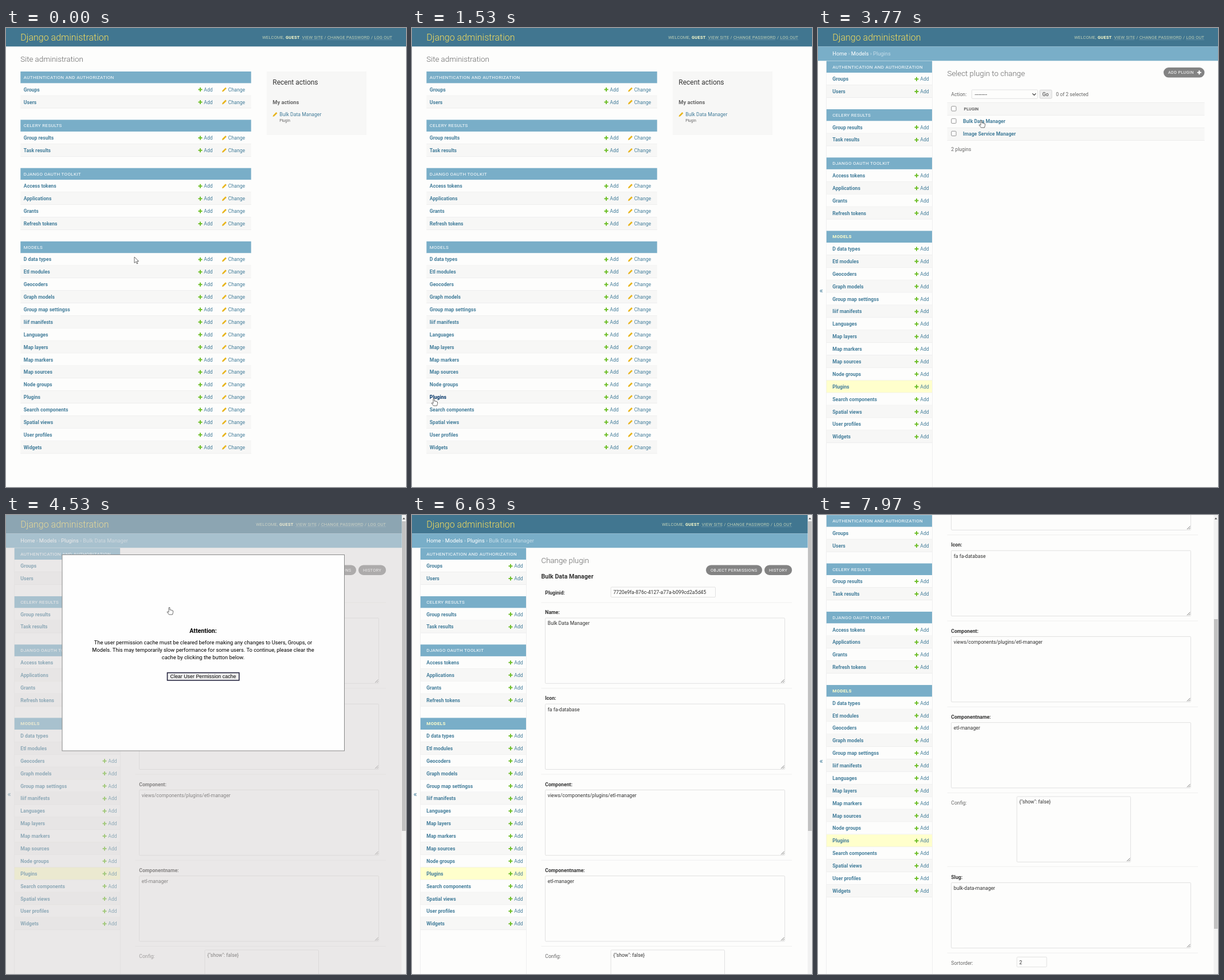
Write an HTML page that moves like this. It is 698 px wide and 802 px high and loops after 8 s.

```html
<!DOCTYPE html>
<html lang="en">
<head>
<meta charset="utf-8">
<title>Site administration</title>
<style>
html, body { margin: 0; width: 100%; height: 100%; overflow: hidden; background: #fdfdfc; }
svg { display: block; width: 100vw; height: 100vh; font-family: Roboto, sans-serif; }
text { white-space: pre; }
#index, #list, #form, #modal, #cursor, #arrow, #hand, .target { animation: 8s step-end infinite; }
#index { animation-name: index; }
#list { animation-name: list; }
#form { animation-name: form; }
#modal { animation-name: modal; }
#arrow { animation-name: arrow; }
#hand { animation-name: hand; }
.target { animation-name: hover; }
#cursor { animation: move 8s ease-in-out infinite; }
#page { animation: scroll 8s linear infinite; }
#sticky { animation: stick 8s linear infinite; }
#thumb { animation: thumb 8s linear infinite; }
@keyframes index { 0% { visibility: visible } 23.4%, 100% { visibility: hidden } }
@keyframes list { 0% { visibility: hidden } 23.4% { visibility: visible } 53.4%, 100% { visibility: hidden } }
@keyframes form { 0% { visibility: hidden } 53.4%, 100% { visibility: visible } }
@keyframes modal { 0% { visibility: hidden } 53.4% { visibility: visible } 78%, 100% { visibility: hidden } }
@keyframes hover { 0% { fill: #447e9b } 15.6%, 100% { fill: #003366 } }
@keyframes arrow {
  0%, 31%, 59.8% { visibility: visible }
  15.6%, 42.2%, 68.5%, 100% { visibility: hidden }
}
@keyframes hand {
  0%, 31%, 59.8%, 78%, 100% { visibility: hidden }
  15.6%, 42.2%, 68.5% { visibility: visible }
}
@keyframes move {
  0%, 4% { transform: translate(224px, 400px) }
  16%, 30.5% { transform: translate(38px, 647px); animation-timing-function: ease-in }
  34.6% { transform: translate(75px, 534px); animation-timing-function: ease-out }
  43%, 59% { transform: translate(285px, 161px) }
  70%, 100% { transform: translate(357px, 281px) }
}
@keyframes scroll {
  0%, 88.1% { transform: translateY(0) }
  91.25% { transform: translateY(-72.5px) }
  99.6%, 100% { transform: translateY(-268px) }
}
@keyframes stick {
  0%, 88.1% { transform: translateY(0) }
  90.6%, 100% { transform: translateY(-57.4px) }
}
@keyframes thumb {
  0%, 88.1% { transform: translateY(0) }
  91.25% { transform: translateY(46px) }
  99.6%, 100% { transform: translateY(170.5px) }
}
</style>
</head>
<body>
<svg id="stage" viewBox="0 0 698 802" preserveAspectRatio="none"></svg>
<script>
const LINK = '#447e9b', GREY = '#666', DARK = '#333', SHADE = '#f7f7f6', RULE = '#ebebeb';
const WIDTH = 698, ROW = 21.88, HEAD = 20.6, GAP = 20;
const modules = [
  ['Authentication and Authorization', 'Groups,Users'],
  ['Celery Results', 'Group results,Task results'],
  ['Django OAuth Toolkit', 'Access tokens,Applications,Grants,Refresh tokens'],
  ['Models', 'D data types,Etl modules,Geocoders,Graph models,Group map settingss,Iiif manifests,' +
    'Languages,Map layers,Map markers,Map sources,Node groups,Plugins,Search components,' +
    'Spatial views,User profiles,Widgets']
];

const rect = (x, y, w, h, fill, extra = '') =>
  `<rect x="${x}" y="${y}" width="${w}" height="${h}" fill="${fill}" ${extra}/>`;
const box = (x, y, w, h, stroke = '#dadada', fill = '#fdfdfc', r = 1.5) =>
  rect(x, y, w, h, fill, `stroke="${stroke}" stroke-width=".8" rx="${r}"`);
const rule = (x1, x2, y) => rect(x1, y - .4, x2 - x1, .8, RULE);
// y is the middle of the capitals
const text = (x, y, str, fill = GREY, size = 8.67, extra = '') =>
  `<text x="${x}" y="${y + size * .356}" fill="${fill}" font-size="${size}" ${extra}>${str}</text>`;
const bold = (x, y, str, fill = LINK, size = 8.67, extra = '') =>
  text(x, y, str, fill, size, 'font-weight="700" ' + extra);
const light = (x, y, str, fill, size) => text(x, y, str, fill, size, 'font-weight="300"');
const plus = (x, y, fill = '#70bf2b') =>
  `<path transform="translate(${x} ${y})" fill="${fill}" d="M-1-3.5h2v2.5h2.5v2h-2.5v2.5h-2v-2.5h-2.5v-2h2.5z"/>`;
const pencil = (x, y) =>
  `<path transform="translate(${x} ${y})" fill="#e8b51c" d="M-4 4l.7-2.6L2-3.9L3.9-2L-1.4 3.3z"/>`;
const pill = (x, y, w, label) =>
  rect(x, y - 8.7, w, 17.4, '#838383', 'rx="8.7"') +
  text(x + 8, y, label, '#fff', 7.33, 'letter-spacing=".33"');

function header(right) {
  const shift = right - 674;
  const underline = (x1, x2) => rect(x1 + shift, 20.3, x2 - x1, .7, '#fff', 'opacity=".25"');
  return rect(0, 0, WIDTH, 32.3, '#417690') +
    light(25.3, 16.4, 'Django administration', '#f5dd5d', 16) +
    text(right + .3, 16.6, 'WELCOME, <tspan font-weight="700">GUEST</tspan>. VIEW SITE / CHANGE PASSWORD / LOG OUT',
      '#ffc', 7.33, 'font-weight="300" letter-spacing=".33" text-anchor="end"') +
    underline(516, 552) + underline(560, 634) + underline(642, 674);
}

function crumbs(parents, last) {
  const sep = '<tspan fill="#c4dce8"> › </tspan>';
  return rect(0, 32.3, WIDTH, 25, '#79aec8') +
    text(25.3, 45, parents.join(sep) + sep + `<tspan fill="#c4dce8">${last}</tspan>`, '#fff', 9.33);
}

function moduleList(x, top, width, sidebar) {
  const pad = sidebar ? 10.5 : 5.5, addX = sidebar ? 172 : 339;
  let y = top, out = '';
  for (const [title, names] of modules) {
    const current = sidebar && title === 'Models';
    out += rect(x, y, width, HEAD, '#79aec8') +
      text(x + pad, y + 10.2, title.toUpperCase(), current ? '#ffc' : '#fff', 8,
        `letter-spacing=".33" font-weight="${current ? 700 : 400}"`);
    y += HEAD;
    names.split(',').forEach((name, i) => {
      const mid = y + ROW / 2, plugin = name === 'Plugins';
      const fill = sidebar && plugin ? '#ffffcc' : i % 2 ? SHADE : '#fdfdfc';
      out += rect(x, y, width, ROW, fill) + rule(x, x + width, y + ROW - .4) +
        bold(x + pad, mid, name, LINK, 8.67, plugin && !sidebar ? 'class="target"' : '') +
        plus(addX, mid) + text(addX + 6.3, mid, 'Add', LINK);
      if (!sidebar) out += pencil(381, mid) + text(387.8, mid, 'Change', LINK);
      y += ROW;
    });
    y += GAP;
  }
  return out;
}

const sidebar = toggleY =>
  rect(14, 57.3, .8, 900, RULE) + rect(199, 57.3, .8, 900, RULE) +
  moduleList(14.8, 57.6, 184.2, true) + text(2.6, toggleY + 1, '«', LINK, 13.33);

function indexPage() {
  return header(674) + light(25.3, 54.5, 'Site administration', GREY, 13.33) +
    moduleList(25.3, 76, 402.4, false) +
    rect(455, 76, 174, 111, SHADE) +
    text(465.3, 94.3, 'Recent actions', DARK, 12) +
    bold(465.3, 129.2, 'My actions', GREY, 9.33) +
    pencil(469.5, 151) + text(477.3, 151.3, 'Bulk Data Manager', LINK) +
    text(477.3, 162, 'Plugin', GREY, 6.67);
}

function listPage() {
  const check = y => box(232.8, y - 4.2, 8.2, 8.2, '#767676', '#fff');
  return header(674) + crumbs(['Home', 'Models'], 'Plugins') + sidebar(457) +
    light(225.5, 79, 'Select plugin to change', GREY, 13.33) +
    pill(603, 77.8, 71.5, 'ADD PLUGIN') + plus(665.3, 77.8, '#fff') +
    text(232.3, 115.6, 'Action:') + box(268.3, 108, 115, 15.3) + text(273.5, 115.6, '---------', DARK) +
    '<path d="M374.2 114.3l3 3l3-3" fill="none" stroke="#333" stroke-width="1.2"/>' +
    box(387, 108.3, 21, 14.8, '#ccc', '#efefef') + text(391.6, 115.8, 'Go', DARK) +
    text(415.2, 115.6, '0 of 2 selected') +
    rect(225.5, 130.3, 449, 22, SHADE) + rule(225.5, 674.5, 130.3) + rule(225.5, 674.5, 152.4) +
    rect(225.5, 174.5, 449, 22, SHADE) + rule(225.5, 674.5, 174.3) + rule(225.5, 674.5, 196.5) +
    check(141) + check(162.6) + check(184.5) +
    bold(254.5, 141.6, 'PLUGIN', GREY, 7.33) +
    bold(253, 163.4, 'Bulk Data Manager') + bold(253, 185.4, 'Image Service Manager') +
    text(232.3, 211.5, '2 plugins');
}

function area(x, y, w, value) {
  const r = x + w - 1, b = y + 114 - 1;
  return box(x, y, w, 114.3) + text(x + 4.3, y + 9.4, value, DARK) +
    `<path d="M${r - 5.5} ${b}L${r} ${b - 5.5}M${r - 2.5} ${b}L${r} ${b - 2.5}" stroke="#555" stroke-width=".8"/>`;
}

function formPage() {
  const field = (y, label, value) =>
    bold(232.3, y, label, DARK) + area(232.5, y + 9.8, 418, value) + rule(225.5, 663, y + 132.6);
  const fields = [['Name:', 'Bulk Data Manager'], ['Icon:', 'fa fa-database'],
    ['Component:', 'views/components/plugins/etl-manager'], ['Componentname:', 'etl-manager']];
  return '<g id="page">' + header(663) +
    crumbs(['Home', 'Models', 'Plugins'], 'Bulk Data Manager') +
    light(225.5, 78.8, 'Change plugin', GREY, 13.33) +
    pill(513, 96.2, 98, 'OBJECT PERMISSIONS') + pill(615, 96.2, 48, 'HISTORY') +
    bold(225.5, 107.3, 'Bulk Data Manager', DARK, 10.67) +
    bold(232.3, 136.4, 'Pluginid:', DARK) + box(347, 126, 182.5, 17.6) +
    text(351.2, 135.2, '7720e9fa-876c-4127-a77a-b099cd2a5d45', DARK) + rule(225.5, 663, 153) +
    fields.map(([label, value], i) => field(170.2 + i * 150.2, label, value)).join('') +
    text(232.3, 770.8, 'Config:') + area(347, 760, 198.5, '{"show": false}') + rule(225.5, 663, 882.3) +
    field(900.6, 'Slug:', 'bulk-data-manager') +
    text(232.3, 1050.8, 'Sortorder:') + box(347, 1040.3, 52, 17.4) + text(351.2, 1049.5, '2', DARK) +
    '</g><g id="sticky">' + sidebar(486) + '</g>' +
    rect(690.5, 0, 7.5, 802, '#f1f1f1') +
    '<path d="M692 7.5l2.3-3l2.3 3z" fill="#505050"/>' +
    `<g id="thumb">${rect(691, 11, 6.6, 541, '#c1c1c1')}</g>`;
}

function modal() {
  const center = (y, str) => text(344, y, str, '#000', 9.33, 'text-anchor="middle"');
  return rect(0, 0, 690.5, 802, '#d7d4d3', 'opacity=".5"') +
    rect(98, 69.5, 492.5, 342.5, '#fefefe', 'stroke="#888"') +
    bold(344, 201.8, 'Attention:', '#000', 10.67, 'text-anchor="middle"') +
    center(222.3, 'The user permission cache must be cleared before making any changes to Users, Groups, or') +
    center(235.3, 'Models. This may temporarily slow performance for some users. To continue, please clear the') +
    center(248.3, 'cache by clicking the button below.') +
    rect(281.5, 275.6, 125.3, 13.3, '#efefef', 'stroke="#1c1c38" stroke-width="1.5"') +
    text(344, 282.3, 'Clear User Permission cache', '#000', 8.89,
      'text-anchor="middle" font-family="Liberation Sans, Arial, sans-serif"');
}

const cursor = `<g id="cursor" fill="#fff" stroke="#444" stroke-width=".8" stroke-linejoin="round">
  <path id="arrow" d="M0 0V10.5L2.6 8.2L4.4 12L6 11.3L4.3 7.6H7.6Z"/>
  <path id="hand" d="M-1 1Q0-.6 1 1V5Q2 4.4 3 5.2Q4 4.8 5 5.8Q6.4 5.6 6.5 7V9.5L5.5 13H-.5L-4 8.5Q-3.4 7-1 9Z"/></g>`;

document.getElementById('stage').innerHTML = rect(0, 0, WIDTH, 802, '#fdfdfc') +
  `<g id="index">${indexPage()}</g><g id="list">${listPage()}</g>` +
  `<g id="form">${formPage()}</g><g id="modal">${modal()}</g>` + cursor;
</script>
</body>
</html>
```
